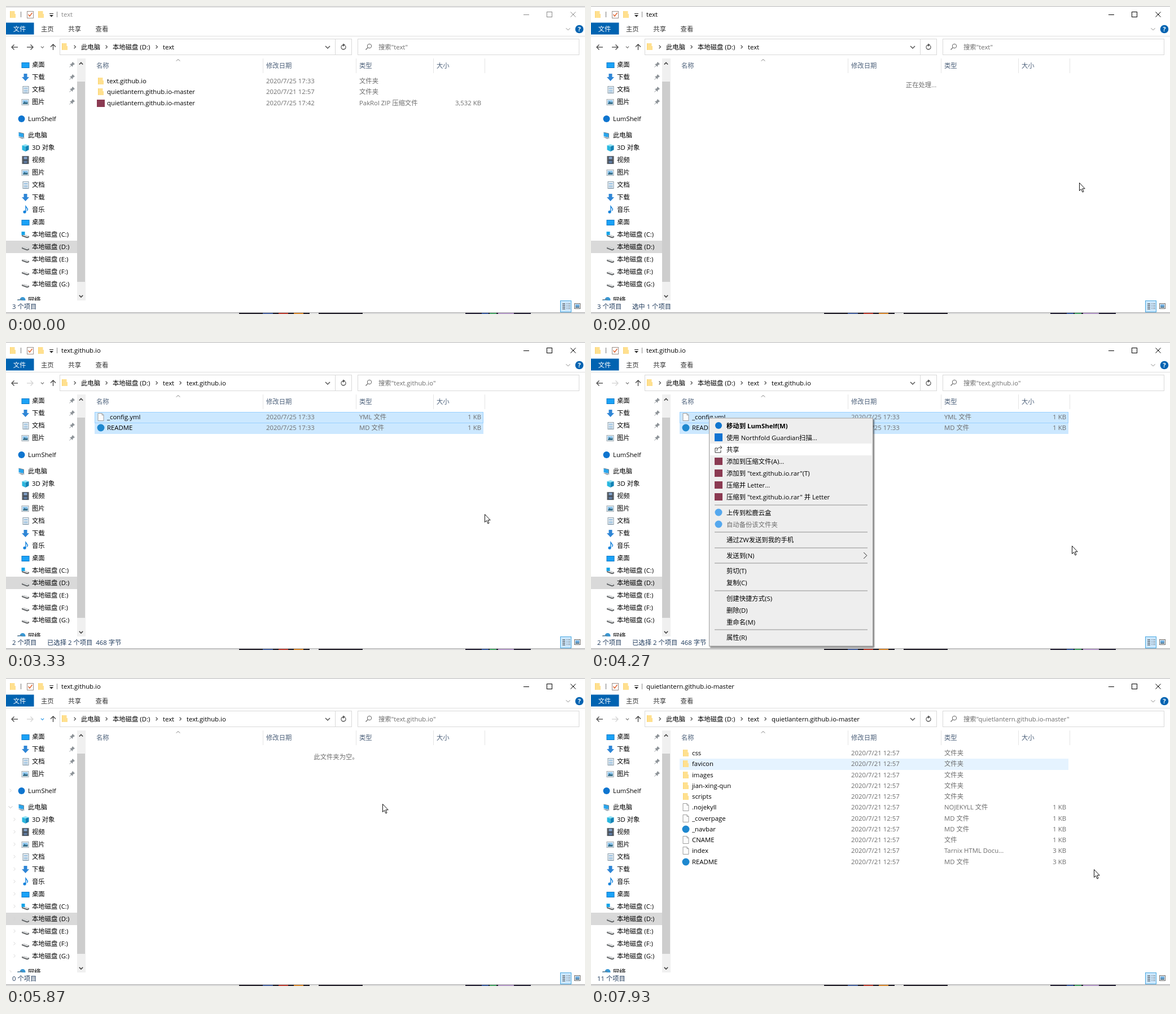
An HTML page with a canvas that plays this animation: 1026 by 546 pixels, repeating every 8 s.

```html
<!DOCTYPE html>
<html lang="zh-CN">
<head>
<meta charset="utf-8">
<title>text</title>
<style>
html, body { margin: 0; width: 100%; height: 100%; overflow: hidden; background: #fff; }
canvas { display: block; }
</style>
</head>
<body>
<canvas id="stage" width="1026" height="546"></canvas>
<script>
const ctx = document.getElementById('stage').getContext('2d');
const LOOP = 8000, FRAMES = 120;
const FONT = '11.35px "Open Sans", "Noto Sans CJK SC", "Noto Sans CJK", sans-serif';
const ROW_TOP = 124, ROW_H = 19.25;
const GREY = '#6d6d6d', ARCHIVE = '#8b3a52', EDITOR = '#1e88cf';

// ---- drawing helpers ----
function text(s, x, y, color = '#000', align = 'left', weight = '') {
  ctx.font = weight + ' ' + FONT;
  ctx.fillStyle = color;
  ctx.textAlign = align;
  ctx.fillText(s, x, y + 4);
}
function box(x, y, w, h, fill, border) {
  if (fill) { ctx.fillStyle = fill; ctx.fillRect(x, y, w, h); }
  if (border) {
    ctx.strokeStyle = border; ctx.lineWidth = 1;
    ctx.strokeRect(x + .5, y + .5, w - 1, h - 1);
  }
}
function line(points, color, width = 1) {
  ctx.beginPath();
  for (let i = 0; i < points.length; i += 2) ctx.lineTo(points[i], points[i + 1]);
  ctx.strokeStyle = color; ctx.lineWidth = width;
  ctx.stroke();
}
function shape(points, fill) {
  ctx.beginPath();
  for (let i = 0; i < points.length; i += 2) ctx.lineTo(points[i], points[i + 1]);
  ctx.closePath();
  ctx.fillStyle = fill;
  ctx.fill();
}
function disc(x, y, r, fill) {
  ctx.beginPath(); ctx.arc(x, y, r, 0, 7);
  ctx.fillStyle = fill; ctx.fill();
}
const chevDown = (x, y, c, r = 3.5, w = 1) => line([x - r, y - r / 2, x, y + r / 2, x + r, y - r / 2], c, w);
const chevUp = (x, y, c, r = 3.5, w = 1) => line([x - r, y + r / 2, x, y - r / 2, x + r, y + r / 2], c, w);
const chevRight = (x, y, c, r = 2.8, w = 1) => line([x - r / 2, y - r, x + r / 2, y, x - r / 2, y + r], c, w);

// ---- icons, centred on x, y ----
const icon = {
  folder(x, y) {
    box(x - 5, y - 6, 8.5, 12, '#ffe08f');
    box(x - 5, y - 6, 1, 12, '#fbd36f');
    box(x + 3, y - 1, 2, 7, '#ffe08f');
  },
  page(x, y) {
    shape([x - 5, y - 6.5, x + 2, y - 6.5, x + 5, y - 3.5, x + 5, y + 6.5, x - 5, y + 6.5], '#fcfcfc');
    line([x + 2, y - 6.5, x - 5, y - 6.5, x - 5, y + 6.5, x + 5, y + 6.5, x + 5, y - 3.5, x + 2, y - 6.5, x + 2, y - 3.5, x + 5, y - 3.5], '#959595', .9);
  },
  editor(x, y) { disc(x, y, 6.5, EDITOR); },
  archive(x, y) { box(x - 7, y - 6, 14, 13, ARCHIVE); },
  cloud(x, y) { disc(x, y, 6, '#0f75cf'); },
  guard(x, y) { box(x - 7, y - 7, 14, 14, '#1373d1'); },
  netdisk(x, y) { disc(x, y, 6.5, '#55a8ee'); },
  share(x, y) {
    line([x - 2, y - 2, x - 6, y - 2, x - 6, y + 6, x + 4, y + 6, x + 4, y + 2], '#333');
    line([x - 3, y + 3, x - 2, y - 1, x + 1, y - 3, x + 6, y - 3], '#333');
    line([x + 3, y - 6, x + 6, y - 3, x + 3, y], '#333');
  },
  desktop(x, y) {
    box(x - 7, y - 4, 14, 10, '#0b78c8');
    box(x - 6, y - 3, 12, 8, '#1aa2f7');
  },
  download(x, y) {
    shape([x - 3, y - 6, x + 3, y - 6, x + 3, y, x + 6.5, y, x, y + 7, x - 6.5, y, x - 3, y], '#2f86d6');
  },
  document(x, y) {
    box(x - 5, y - 6, 11, 13, '#f7fafc', '#8497a5');
    for (let i = 0; i < 4; i++) box(x - 3, y - 3 + i * 2.5, 7, 1, i % 2 ? '#7da4c4' : '#4d91c9');
  },
  picture(x, y) {
    box(x - 7, y - 5, 13, 11, '#f8fbfd', '#9aa6ae');
    box(x - 5, y - 3, 9, 7, '#8dc5ed');
    shape([x - 5, y + 4, x - 2, y - 1, x + 1, y + 1, x + 4, y, x + 4, y + 4], '#3b718c');
  },
  pc(x, y) {
    shape([x - 5, y - 5, x + 4, y - 3, x + 4, y + 4, x - 5, y + 2], '#2aa5ec');
    shape([x - 6, y + 3, x, y + 3, x + 6, y + 5, x + 1, y + 7], '#a5b0b9');
    line([x - 5, y - 5, x + 4, y - 3, x + 4, y + 4], '#77848e');
  },
  cube(x, y) {
    shape([x - 6, y - 4, x, y - 6, x + 6, y - 4, x, y - 2], '#8ce2f5');
    shape([x - 6, y - 4, x, y - 2, x, y + 7, x - 6, y + 4], '#28b7df');
    shape([x + 6, y - 4, x, y - 2, x, y + 7, x + 6, y + 4], '#1283b5');
  },
  video(x, y) {
    box(x - 6, y - 7, 12, 14, '#3c4249');
    box(x - 3, y - 6, 6, 5, '#7e9cc2');
    box(x - 3, y + 1, 6, 5, '#5d789c');
    for (let i = 0; i < 5; i++) {
      box(x - 5, y - 6 + i * 2.7, 1, 1, '#ddd');
      box(x + 4, y - 6 + i * 2.7, 1, 1, '#ddd');
    }
  },
  music(x, y) {
    disc(x - 1.5, y + 4, 2.6, '#1683dc');
    line([x + .5, y + 4, x + .5, y - 6, x + 4, y - 1, x + 3, y + 2], '#1683dc', 1.4);
  },
  drive(x, y) {
    shape([x - 6.5, y + 1, x - 3, y, x + 6.5, y + 3, x + 6.5, y + 5, x + 3, y + 6.5, x - 6.5, y + 3], '#5d6062');
    shape([x - 6.5, y + 1, x - 3, y, x + 6.5, y + 3, x + 3, y + 4.5], '#dcdedf');
  },
  system(x, y) {
    icon.drive(x, y);
    box(x - 7, y - 5, 6, 6, '#14a4e8');
  },
  network(x, y) {
    disc(x + 2, y, 5, '#3a97d3');
    box(x - 7, y - 1, 8, 6, '#75b9e4', '#68757e');
  }
};

// ---- folder contents ----
const REPO = 'quietlantern.github.io-master', SITE = 'text.github.io';
const rootRows = time => [
  ['folder', SITE, '2020/7/25 ' + time, '文件夹'],
  ['folder', REPO, '2020/7/21 12:57', '文件夹'],
  ['archive', REPO, '2020/7/25 17:42', 'PakRol ZIP 压缩文件', '3,532 KB']
];
const siteRows = [
  ['page', '_config.yml', '2020/7/25 17:33', 'YML 文件', '1 KB'],
  ['editor', 'README', '2020/7/25 17:33', 'MD 文件', '1 KB']
];
const repoRows = [
  ...['css', 'favicon', 'images', 'jian-xing-qun', 'scripts'].map(s => ['folder', s, , '文件夹']),
  ['page', '.nojekyll', , 'NOJEKYLL 文件', '1 KB'],
  ['page', '_coverpage', , 'MD 文件', '1 KB'],
  ['editor', '_navbar', , 'MD 文件', '1 KB'],
  ['page', 'CNAME', , '文件', '1 KB'],
  ['page', 'index', , 'Tarnix HTML Docu...', '3 KB'],
  ['editor', 'README', , 'MD 文件', '3 KB']
];

const sidebar = [
  ['desktop', '桌面', 104], ['download', '下载', 126], ['document', '文档', 148], ['picture', '图片', 170],
  ['cloud', 'LumShelf', 199.5], ['pc', '此电脑', 229],
  ...[['cube', '3D 对象'], ['video', '视频'], ['picture', '图片'], ['document', '文档'], ['download', '下载'],
    ['music', '音乐'], ['desktop', '桌面'], ['system', '本地磁盘 (C:)'], ['drive', '本地磁盘 (D:)'],
    ['drive', '本地磁盘 (E:)'], ['drive', '本地磁盘 (F:)'], ['drive', '本地磁盘 (G:)']
  ].map(([i, s], k) => [i, s, 250.7 + k * 22]),
  ['network', '网络', 521]
];

const menu = [
  [149, '移动到 LumShelf(M)', 'cloud'], [170, '使用 Northfold Guardian扫描...', 'guard'], [191, '共享', 'share'],
  [212, '添加到压缩文件(A)...', 'archive'], [233, '添加到 "text.github.io.rar"(T)', 'archive'],
  [254, '压缩并 Letter...', 'archive'], [275, '压缩到 "text.github.io.rar" 并 Letter', 'archive'],
  [303, '上传到松鹿云盒', 'netdisk'], [324, '自动备份该文件夹', 'netdisk'],
  [351, '通过ZW发送到我的手机'], [379, '发送到(N)'], [406, '剪切(T)'], [427, '复制(C)'],
  [455, '创建快捷方式(S)'], [476, '删除(D)'], [497, '重命名(M)'], [524, '属性(R)']
];
const separators = [289, 337, 365, 392, 441, 510];

// ---- pointer: step, x, y ----
const path = [
  [11, 979, 463], [14, 928, 398], [17, 882, 328], [20, 865, 313], [30, 865, 313],
  [36, 888, 336], [39, 880, 343], [42, 860, 326], [45, 848, 305], [63, 848, 305],
  [64, 852, 361], [67, 870, 497], [68, 872, 555], [71, 874, 626], [72, 874, 626], [73, 874, 647],
  [85, 874, 647], [86, 733, 324], [88, 667, 223], [91, 650, 205], [97, 655, 244],
  [99, 655, 244], [103, 780, 300], [107, 882, 342], [109, 891, 339], [120, 891, 339]
];
function pointerAt(n) {
  if (n < path[0][0]) return null;
  const i = path.findIndex(p => p[0] > n);
  const [n0, x0, y0] = path[i - 1], [n1, x1, y1] = path[i];
  const k = (n - n0) / (n1 - n0);
  return { x: x0 + (x1 - x0) * k, y: y0 + (y1 - y0) * k };
}
const ramp = (n, a, b) => Math.max(0, Math.min(1, (n - a) / (b - a)));

function stateAt(n) {
  const p = pointerAt(n);
  const s = { n, p, active: n >= 25, folder: '', rows: [], message: '', selected: [], focus: -1, hover: -1 };
  s.menu = n < 79 ? ramp(n, 56, 60) : 1 - ramp(n, 78, 81);
  s.arrows = n < 95 ? ramp(n, 85, 88) : 1 - ramp(n, 95, 101);
  s.dragging = n >= 40 && n < 49;
  if (n < 31) {
    s.rows = rootRows('17:33');
    s.status = ['3 个项目', n >= 25 ? '选中 1 个项目' : ''];
    if (n >= 25) { s.selected = [0]; s.focus = 0; }
  } else if (n < 99) {
    s.folder = SITE;
    s.rows = n < 81 ? siteRows : [];
    if (n >= 81) s.message = '此文件夹为空。';
    if (n >= 40) s.selected = [0, 1].filter(i => p.y - 171 < ROW_TOP + ROW_H * (i + 1) || n >= 45);
    if (n >= 45) s.focus = 0;
    s.status = [n < 83 ? '2 个项目' : '0 个项目', n >= 49 && n < 83 ? '已选择 2 个项目  468 字节' : ''];
  } else if (n < 119) {
    s.rows = rootRows('17:44');
    s.focus = n < 112 ? 0 : 1;
    s.selected = [s.focus];
    s.status = ['3 个项目', '选中 1 个项目'];
  } else {
    s.folder = REPO;
    s.rows = repoRows;
    s.status = ['11 个项目', ''];
  }
  if (n === 30 || n === 118) { s.rows = []; s.message = '正在处理...'; }
  if (p && !s.dragging && !s.menu && p.x > 797) s.hover = Math.floor((p.y - 178 - ROW_TOP) / ROW_H);
  return s;
}

// ---- window parts ----
function drawTitle(s) {
  const ink = s.active ? '#000' : '#8a8a8a';
  box(0, s.active ? 0 : 1, 1026, 1, s.active ? '#b4b4b4' : '#a6a6a6');
  icon.folder(12, 15);
  box(26, 10, 1, 10, '#777');
  box(37, 9, 12, 13, '#fff', '#9a8f89');
  line([39.5, 15, 42, 18, 46.5, 12], '#e0632f', 1.4);
  icon.folder(62, 15);
  box(77, 13, 7, 1, '#222');
  shape([77, 16, 84, 16, 80.5, 19.5], '#222');
  box(90, 10, 1, 10, '#888');
  text(s.folder || 'text', 98, 15, ink);
  box(917, 15, 10, 1, ink);
  box(958, 10, 10, 10, null, ink);
  line([1000.5, 10.5, 1009.5, 19.5], ink);
  line([1009.5, 10.5, 1000.5, 19.5], ink);

  const tabHover = s.n >= 89 && s.n < 94;
  box(0, 29.5, 49.5, 21, tabHover ? '#1979ca' : '#0063b1');
  text('文件', 24, 40.5, '#fff', 'center');
  ['主页', '共享', '查看'].forEach((t, i) => text(t, 62 + i * 48.3, 40.5, '#333'));
  chevDown(996, 41, '#888');
  disc(1016, 41, 7.3, '#0063b1');
  text('?', 1016, 41, '#fff', 'center', 'bold');
  box(0, 53, 1026, 1, '#dfdfdf');
}

function arrow(x, y, dir, color) {
  line([x - 5.5, y, x + 5.5, y], color, 1.3);
  line([x + dir, y - 4.5, x + dir * 5.5, y, x + dir, y + 4.5], color, 1.3);
}

function drawAddress(s) {
  arrow(15.5, 73, -1, '#444');
  arrow(42.5, 73, 1, s.folder ? '#d2d2d2' : '#444');
  chevDown(64.5, 73, s.n >= 87 && s.n < 92 ? '#2f9be8' : '#777', 2.6, 1.2);
  line([83.5, 78, 83.5, 68], '#444', 1.3);
  line([79, 72.5, 83.5, 68, 88, 72.5], '#444', 1.3);
  box(95, 58, 518, 29, '#fff', '#d9d9d9');
  box(583, 58, 1, 29, '#d9d9d9');
  icon.folder(104, 72);
  const crumbs = [[133, '此电脑'], [189, '本地磁盘 (D:)'], [278, 'text']];
  if (s.folder) crumbs.push([320, s.folder]);
  for (const [x, t] of crumbs) {
    chevRight(x - 11, 72.5, '#444', 2.8, 1.2);
    text(t, x, 72.5);
  }
  if (!s.folder && s.n >= 99) chevRight(309, 72.5, '#444', 2.8, 1.2);
  chevDown(570, 73, '#555', 4, 1.5);
  ctx.beginPath(); ctx.arc(598, 73, 4, -.7, 4.6);
  ctx.strokeStyle = '#555'; ctx.lineWidth = 1.3; ctx.stroke();
  shape([597, 66.5, 601.5, 69, 597, 72], '#555');

  box(623, 58, 393, 29, '#fff', '#d9d9d9');
  ctx.beginPath(); ctx.arc(644, 71, 3.7, 0, 7);
  ctx.strokeStyle = '#666'; ctx.lineWidth = 1; ctx.stroke();
  line([641.3, 73.7, 637.5, 77.5], '#666', 1.2);
  text('搜索"' + (s.folder || 'text') + '"', 660, 73, GREY);
}

function pin(x, y) {
  line([x - 4.5, y + 4.5, x - 1, y + 1], '#8d9398', 1);
  shape([x - 4, y - 1, x - 1, y - 1.5, x + 1, y - 5, x + 5, y - 1, x + 1.5, y + 1, x + 1, y + 4], '#8d9398');
}

function drawSidebar(s) {
  ctx.save();
  ctx.beginPath(); ctx.rect(0, 88, 142, 434); ctx.clip();
  box(0, 416, 126, 22, '#d9d9d9');
  sidebar.forEach(([name, label, y], i) => {
    const top = [4, 5, 18].includes(i);
    icon[name](top ? 27.5 : 34.5, Math.round(y));
    text(label, top ? 39 : 46, y);
    if (i < 4) pin(117, y);
    else if (s.arrows) {
      ctx.globalAlpha = s.arrows;
      if (i === 5) chevDown(8, y, '#bdbdbd');
      else chevRight(top ? 8 : 15, y, '#d5d5d5');
      ctx.globalAlpha = 1;
    }
  });
  box(126, 93, 15, 429, '#f0f0f0');
  box(126, 134, 14, 355, '#cdcdcd');
  chevUp(133, 102, '#444', 3.2, 1.5);
  chevDown(133, 514.5, '#444', 3.2, 1.5);
  ctx.restore();
}

function drawList(s) {
  const rowTop = i => Math.round(ROW_TOP + i * ROW_H);
  chevUp(305, 96, '#777', 3.2);
  [[160, '名称'], [461, '修改日期'], [626, '类型'], [763, '大小']].forEach(([x, t]) => text(t, x, 105.5, '#4c607a'));
  [455, 620, 757, 848].forEach(x => box(x, 93, 1, 26, '#e5e5e5'));
  s.rows.forEach(([kind, name, date = '2020/7/21 12:57', type, size], i) => {
    const y = 133 + i * ROW_H;
    const on = s.selected.includes(i);
    if (on || i === s.hover) box(157, rowTop(i), 689, 20, on ? '#cce8ff' : '#e5f3ff');
    icon[kind](168, Math.round(y));
    text(name, 179, y);
    text(date, 461, y, GREY);
    text(type, 626, y, GREY);
    if (size) text(size, 842, y, GREY, 'right');
  });
  if (s.rows.length && s.selected.includes(s.focus)) box(157, rowTop(s.focus), 689, 20, null, '#99d1ff');
  if (s.message) text(s.message, 585, 140, GREY, 'center');
  if (s.dragging) {
    const x = Math.round(s.p.x - 639), y = Math.round(s.p.y - 171);
    box(x, y, 242 - x, 173 - y, 'rgba(0,120,215,.3)', '#0078d7');
  }
}

function drawStatus(s) {
  text(s.status[0], 11, 532.5, '#1e395b');
  text(s.status[1], 73, 532.5, '#1e395b');
  box(982, 522, 20, 21, '#cce8ff', '#4aa8e0');
  for (let i = 0; i < 4; i++) {
    box(986, 527 + i * 3, 5, 2, '#7e8790');
    box(993, 527 + i * 3, 2, 1, '#7e8790');
    box(996, 527 + i * 3, 4, 1, '#7e8790');
  }
  box(1007, 527, 11, 10, '#fff', '#666');
  box(1009, 529, 7, 4, '#6eabdc');
  box(1009, 533, 7, 2, '#52758c');

  box(0, 543, 1026, 1, '#aaa');
  box(0, 544, 1026, 2, '#dedede');
  [[413, 219, '#25222d'], [455, 18, '#4b64a0'], [483, 17, '#bd4034'], [510, 17, '#d98a32'], [538, 16, '#e5e5e5'],
    [814, 116, '#29263a'], [843, 12, '#3c5da1'], [857, 12, '#4aa66a'], [872, 28, '#b69bc9']
  ].forEach(([x, w, c]) => box(x, 544, w, 2, c));
}

function drawMenu(s) {
  if (!s.menu) return;
  ctx.save();
  ctx.globalAlpha = s.menu;
  ctx.shadowColor = 'rgba(0,0,0,.5)';
  ctx.shadowBlur = 2; ctx.shadowOffsetX = 2; ctx.shadowOffsetY = 2;
  box(209, 134.5, 291, 405, '#eee');
  ctx.shadowColor = 'transparent';
  box(209, 134.5, 291, 405, null, '#a0a0a0');
  separators.forEach(y => box(219, y - .5, 271, 1, '#919191'));
  menu.forEach(([y, label, name], i) => {
    if (Math.abs(s.p.y - 171 - y) < 10.5) box(211, y - 11, 286, 21, '#fff');
    if (name) icon[name](226, y - 1);
    text(label, 240, y, i === 8 ? GREY : '#000', 'left', i ? '' : 'bold');
  });
  chevRight(486, 378.5, '#222', 5.5);
  ctx.restore();
}

function drawPointer(p) {
  if (!p) return;
  ctx.save();
  ctx.translate(Math.round(p.x) + .5, Math.round(p.y) + .5);
  const outline = [0, 0, 0, 14, 3, 11, 5.5, 16.5, 7.5, 15.5, 5.3, 10.3, 9.7, 10.3, 0, 0];
  shape(outline, '#fff');
  line(outline, '#111');
  ctx.restore();
}

function draw(now) {
  const n = Math.floor(((now % LOOP) + 5) * FRAMES / LOOP) % FRAMES;
  const s = stateAt(n);
  box(0, 0, 1026, 546, '#fff');
  drawTitle(s);
  drawAddress(s);
  drawSidebar(s);
  drawList(s);
  drawStatus(s);
  drawMenu(s);
  drawPointer(s.p);
}

const start = performance.now();
function tick() {
  draw(performance.now() - start);
  requestAnimationFrame(tick);
}
tick();
</script>
</body>
</html>
```
